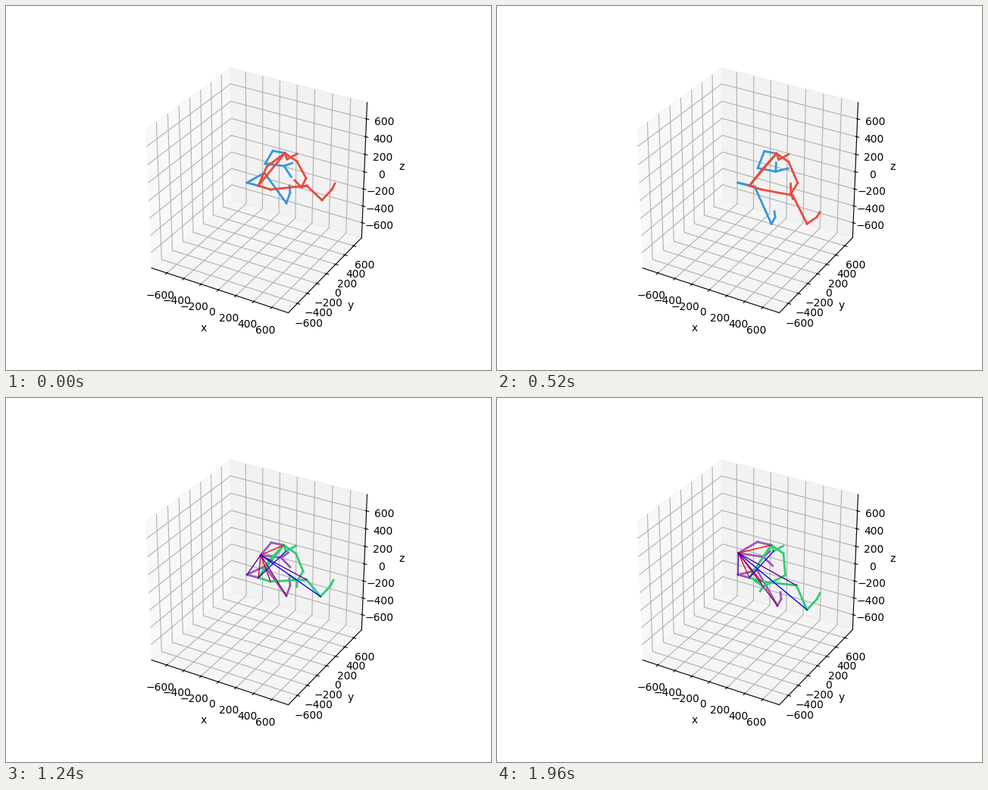
These frames come from a looping animation (640x480 px, 2 s). A matplotlib script:

```python
import numpy as np
import matplotlib.pyplot as plt
from matplotlib.animation import FuncAnimation
from matplotlib.collections import LineCollection

W, H, DPI = 640, 480, 100
STEP_MS, HALF = 40, 25
BLUE, RED, PURPLE, GREEN = "#3498db", "#e74c3c", "#9b59b6", "#2ecc71"

# Starting stance in stage pixels; hand tips and spine follow from it
STANCE = {
    "root": (333, 237), "neck": (368, 194), "head": (371, 202), "top": (384, 195),
    "hip_l": (318, 233), "knee_l": (341, 220), "ankle_l": (370, 260),
    "foot_l": (375, 246), "toe_l": (374, 237),
    "hip_r": (349, 242), "knee_r": (397, 237), "ankle_r": (417, 256),
    "foot_r": (430, 242), "toe_r": (434, 234),
    "shoulder_l": (352, 191), "elbow_l": (342, 208), "wrist_l": (367, 211),
    "shoulder_r": (384, 205), "elbow_r": (396, 227), "wrist_r": (390, 239),
}
UPPER = ["neck", "head", "top"] + [f"{part}_{side}" for side in "lr"
                                   for part in ("shoulder", "elbow", "wrist")]


def chains(side):
    names = ["root hip_ knee_ ankle_ foot_ toe_",
             "neck shoulder_ elbow_ wrist_ thumb_", "wrist_ hand_"]
    return [c.replace("_", "_" + side).split() for c in names]


LEFT = chains("l")
RIGHT = chains("r") + [["root", "spine", "neck", "head", "top"], ["root", "neck"]]

# Each fan runs from red to blue
ROOT_FAN = [("root", j) for j in
            ("hip_l", "spine", "wrist_l", "foot_r", "elbow_r", "neck", "foot_l")]
ELBOW_FAN = [("elbow_l", j) for j in
             ("neck", "root", "hip_r", "ankle_l", "knee_r", "hip_l", "ankle_r")]
ELBOW_FAN.insert(-1, ("root", "head"))


def settle(n):
    return 1 - np.exp(-n / 4)


def tip(wrist, length, degrees):
    a = np.radians(degrees)
    return wrist + length * np.array([np.cos(a), np.sin(a)])


def finish(p, n, turns):
    """Add the bending spine and the turning hands."""
    p["spine"] = (p["root"] + p["neck"]) / 2 - np.exp(-n / 6) * np.array([6.5, 3.5])
    tips = [("thumb_l", 11.5, -20), ("hand_l", 17, 57),
            ("thumb_r", 13, 225), ("hand_r", 7.5, -16)]
    for (name, length, angle), turn in zip(tips, turns):
        p[name] = tip(p["wrist_" + name[-1]], length, angle + turn * settle(n))
    return p


def stance():
    return {name: np.array(xy, float) for name, xy in STANCE.items()}


def true_pose(n):
    """The legs stretch down while the upper body dips, then rises."""
    p = stance()
    for name in UPPER:
        p[name] += n * np.array([0.94 - 0.0675 * n, 1.6 - 0.12 * n])
    p["elbow_l"] += 0.1 * n, 0.4 * n
    p["elbow_r"] += 0, 0.45 * n
    p["wrist_l"] += 0, 7 * settle(n)
    p["wrist_r"] += -3 * settle(n), 0.6 * n
    p["knee_l"] += -0.006 * n**2, 1.4 * n
    p["knee_r"] += -0.04 * n**2, 0.075 * n**2
    for side, extra in (("l", 0), ("r", 0.3)):
        for part, rate in (("ankle_", 2.1), ("foot_", 2.5), ("toe_", 2.6)):
            p[part + side] += -0.047 * n**2, (rate + extra) * n
    return finish(p, n, (-70, -74, 45, 90))


def predicted_pose(n):
    """The arms drift left and the feet sink slowly."""
    p = stance()
    for name in UPPER:
        p[name] += -0.25 * n, 0
    p["shoulder_l"] += -0.1 * n, -0.05 * n
    p["elbow_l"] += -0.73 * n, -0.15 * n
    p["wrist_l"] += -0.4 * n, -0.06 * n
    p["elbow_r"] += -0.4 * n, 0.28 * n
    p["wrist_r"] += -0.5 * n - 0.036 * n**2, 0.4 * n
    p["knee_l"] += 0.1 * n, 0.3 * n
    p["knee_r"] += -0.08 * n, 0.42 * n
    for part, sink in (("ankle_", 0.024), ("foot_", 0.033), ("toe_", 0.033)):
        p[part + "l"] += 0, sink * n**2
        p[part + "r"] += -0.33 * n, 0.97 * n
    return finish(p, n, (-20, -14, -10, 140))


fig = plt.figure(figsize=(W / DPI, H / DPI), dpi=DPI)
ax = fig.add_subplot(projection="3d")
ax.view_init(30, -60)
ax.set_box_aspect((1, 1, 1), zoom=3 ** 0.5 / 1.8294640721620434)
lim = 750 * 25 / 24
ticks = np.arange(-600, 601, 200)
ax.set(xlim=(-lim, lim), ylim=(-lim, lim), zlim=(-lim, lim),
       xticks=ticks, yticks=ticks, zticks=ticks,
       xlabel="x", ylabel="y", zlabel="z")

# Flat layer in stage pixels for the skeleton
stage = fig.add_axes([0, 0, 1, 1])
stage.set(xlim=(0, W), ylim=(H, 0))
stage.axis("off")


def add_lines(width, z):
    lines = LineCollection([], linewidths=width, capstyle="projecting", zorder=z)
    stage.add_collection(lines, autolim=False)
    return lines


left, right, links = add_lines(2, 2), add_lines(2, 3), add_lines(1, 4)


def bones(p, paths):
    return [(p[a], p[b]) for path in paths for a, b in zip(path, path[1:])]


def draw(i):
    predicted, n = divmod(i, HALF)
    p = predicted_pose(n) if predicted else true_pose(n)
    left.set_segments(bones(p, LEFT))
    right.set_segments(bones(p, RIGHT))
    left.set_color(PURPLE if predicted else BLUE)
    right.set_color(GREEN if predicted else RED)
    fan = (ROOT_FAN if n < 6 else ELBOW_FAN) if predicted else []
    links.set_segments(bones(p, fan))
    links.set_color([(1 - s, 0, s) for s in np.linspace(0, 1, len(fan))])
    return left, right, links


anim = FuncAnimation(fig, draw, frames=2 * HALF, interval=STEP_MS,
                     init_func=lambda: draw(0), repeat=True, repeat_delay=0)
plt.show()
```
